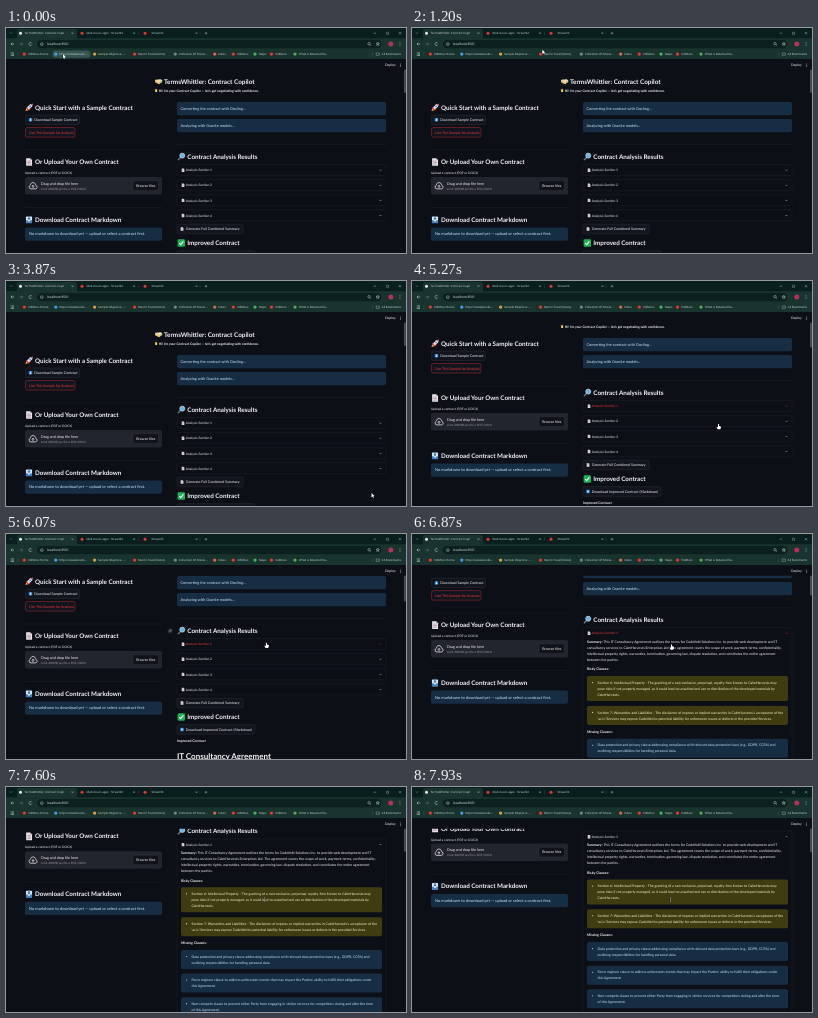
Animation, 400 px wide and 225 px high, one loop 8000 ms. Source, as an HTML page with a canvas:

```html
<!DOCTYPE html>
<html lang="en">
<head>
<meta charset="utf-8">
<title>Contract Copilot</title>
<style>
html, body { margin: 0; width: 100%; height: 100%; overflow: hidden; background: #0c0f16; }
canvas { display: block; width: 100vw; height: 100vh; }
</style>
</head>
<body>
<canvas></canvas>
<script>
const canvas = document.querySelector('canvas');
const ctx = canvas.getContext('2d');
const LOOP = 8000;
const PAGE = '#0c0f16', WHITE = '#f4f5f7', GREY = '#9a9ba2', RED = '#f0383f', LINE = '#2b2e37';
const BLUE = '#172d43', BLUE_TEXT = '#c7e6fa', YELLOW = '#3f3c12', YELLOW_TEXT = '#f7f5bd';
const BAR = '#19332f', BAR_TEXT = '#cfdcd8';
const PAGE_FONT = 'Lato, sans-serif', BAR_FONT = '"Open Sans", sans-serif';
const DETAIL = 3.5;

// Each track is a list of [time, ...values], eased between neighbours.
const CURSOR = [[0, 57, 26], [350, 57, 26], [2000, 197, 17.5], [2350, 197, 17.5], [3700, 365.5, 212],
  [4250, 365.5, 212], [5000, 306.5, 143], [5300, 306.5, 143], [5850, 260.5, 108.5], [7000, 259.5, 110.5],
  [7300, 259.5, 110.5], [7800, 258.3, 110.5]];
const SCROLL = [[0, 0], [5000, 0], [5240, 17], [5500, 17], [5950, 32], [6750, 32], [7110, 73.5],
  [7350, 73.5], [7800, 92.5]];
const OPEN = [[0, 0], [6250, 0], [6600, 1]];

function sample(track, t) {
  const next = track.findIndex(key => key[0] > t);
  if (next < 0) return track[track.length - 1].slice(1);
  const a = track[next - 1], b = track[next];
  const p = (t - a[0]) / (b[0] - a[0]), eased = p * p * (3 - 2 * p);
  return a.slice(1).map((v, i) => v + (b[i + 1] - v) * eased);
}

function text(s, x, y, size, color = WHITE, weight = 400, font = PAGE_FONT) {
  ctx.font = `${weight} ${size}px ${font}`;
  ctx.fillStyle = color;
  ctx.fillText(s, x, y + size * 0.34);
}
const barText = (s, x, y, size = 2.9, color = BAR_TEXT) => text(s, x, y, size, color, 400, BAR_FONT);

function box(x, y, w, h, fill, stroke, r = 1.8) {
  ctx.beginPath();
  ctx.roundRect(x, y, w, h, r);
  if (fill) { ctx.fillStyle = fill; ctx.fill(); }
  if (stroke) { ctx.strokeStyle = stroke; ctx.lineWidth = 0.35; ctx.stroke(); }
}
function dot(x, y, r, color) {
  ctx.beginPath();
  ctx.arc(x, y, r, 0, 7);
  ctx.fillStyle = color;
  ctx.fill();
}
function ring(x, y, r, color, width = 0.5, from = 0, to = 7) {
  ctx.beginPath();
  ctx.arc(x, y, r, from, to);
  ctx.strokeStyle = color;
  ctx.lineWidth = width;
  ctx.stroke();
}
function trace(points, close) {
  ctx.beginPath();
  for (let i = 0; i < points.length; i += 2) ctx.lineTo(points[i], points[i + 1]);
  if (close) ctx.closePath();
}
function line(points, color, width = 0.5) {
  trace(points);
  ctx.strokeStyle = color;
  ctx.lineWidth = width;
  ctx.stroke();
}
function shape(points, color) {
  trace(points, true);
  ctx.fillStyle = color;
  ctx.fill();
}
function at(x, y, scale, draw) {
  ctx.save();
  ctx.translate(x, y);
  ctx.scale(scale, scale);
  draw();
  ctx.restore();
}
const rule = (x, y, w) => line([x, y, x + w, y], LINE, 0.3);
const chevron = (x, y, d, color = WHITE) => line([x - 1, y - d, x, y + d, x + 1, y - d], color, 0.4);
const cross = (x, y, r, color) => { line([x - r, y - r, x + r, y + r], color, 0.4); line([x - r, y + r, x + r, y - r], color, 0.4); };
const moreDots = (x, y, color) => [-1.3, 0, 1.3].forEach(d => dot(x, y + d, 0.42, color));

// Icons fill about 8 x 8 units around their centre.
const icons = {
  handshake() {
    shape([-4, -1, -1.6, -2.6, 1, -1.6, 3, 1, 0.6, 3, -2.5, 1.8], '#efc77d');
    shape([4, -1, 1.6, -2.8, -1, -1.4, 0.5, 0.3, 2, -0.3, 3.2, 1], '#f7e2b5');
    box(-4, -2, 1.2, 3, '#c9d3d9', null, 0.3);
    box(2.9, -2, 1.2, 3, '#c9d3d9', null, 0.3);
  },
  wave() {
    box(-2.2, -1.5, 5, 5, '#f3d24b', null, 2);
    [-1.6, -0.1, 1.4].forEach(x => box(x, -4, 1.2, 4, '#f3d24b', null, 0.6));
    line([-3.5, -2, -2.8, -3.5], '#7fbd58', 0.8);
  },
  rocket() {
    shape([-3.8, 3.8, -2.8, 0.8, -0.8, 2.8], '#ffb02e');
    shape([-3.4, 0.3, -0.5, -1.6, 1.7, 0.6, 0, 3.5], '#e4314d');
    shape([4, -4, 1, -3.4, -2, 0.2, -0.2, 2, 3.3, -1], '#d9dfe6');
    shape([4, -4, 1.8, -3.5, 3.4, -1.8], '#e4314d');
    dot(1.2, -1.2, 0.9, '#3d8ad0');
  },
  page() {
    shape([-3, -4, 1.2, -4, 3.2, -2, 3.2, 4, -3, 4], '#e9e6ea');
    shape([1.2, -4, 3.2, -2, 1.2, -2], '#a9a6b6');
    [-1, 0.6, 2.2].forEach(y => line([-1.8, y, 2, y], '#9c6d80', 0.6));
  },
  inbox() {
    box(-3.2, -3.2, 6.4, 7, '#dce9f5', null, 0.7);
    shape([-3.2, 0.7, -1.5, 0.7, -0.8, 2, 0.8, 2, 1.5, 0.7, 3.2, 0.7, 3.2, 4, -3.2, 4], '#3f7fc4');
    line([0, -4, 0, -0.8], '#2b70bd', 1.2);
    shape([-1.8, -1.4, 1.8, -1.4, 0, 0.8], '#2b70bd');
  },
  lens() {
    line([-0.8, 0.9, -3.6, 3.7], '#6f7d8c', 1.4);
    dot(1, -1, 2.6, '#5fb4e8');
    ring(1, -1, 2.6, '#d7dfe6', 0.8);
  },
  check() {
    box(-3.9, -3.9, 7.8, 7.8, '#16b455', null, 1.4);
    line([-2.1, 0.2, -0.6, 1.8, 2.2, -1.7], '#fff', 1.2);
  },
  download() {
    box(-4, -4, 8, 8, '#2b86d3', null, 1.2);
    line([0, -2.8, 0, 1.5], '#fff', 1.4);
    shape([-2.4, 0, 2.4, 0, 0, 3], '#fff');
  },
  cloud() {
    ctx.beginPath();
    ctx.arc(-2, 1, 1.9, 1.57, 4.3);
    ctx.arc(0, -1, 2.5, 3.5, 6);
    ctx.arc(2.3, 1.1, 1.8, 5, 7.85);
    ctx.closePath();
    ctx.strokeStyle = WHITE;
    ctx.lineWidth = 0.7;
    ctx.stroke();
    line([0, 2.2, 0, -0.6], WHITE, 0.7);
    line([-1.2, 0.6, 0, -0.7, 1.2, 0.6], WHITE, 0.7);
  },
};

function heading(icon, s, x, y) {
  at(x + 4, y, 0.95, icons[icon]);
  text(s, x + 10, y, 6.28, WHITE, 700);
}
function button(x, y, w, label, icon, color = WHITE) {
  box(x, y - 4.8, w, 9.6, '#12151d', color === WHITE ? '#3a3d46' : color);
  if (icon) at(x + 5, y, 0.44, icons[icon]);
  text(label, x + (icon ? 8.8 : 3.6), y, 3.6, color);
}
function notice(x, y, w, h, lines, fill, color) {
  box(x, y, w, h, fill);
  const first = y + h / 2 - (lines.length - 1) * 3;
  dot(x + 5.6, first, 0.55, color);
  lines.forEach((s, i) => text(s, x + 10.5, first + i * 6, DETAIL, color));
}

function leftColumn() {
  heading('rocket', 'Quick Start with a Sample Contract', 19, 79.5);
  button(19.5, 91.8, 54, 'Download Sample Contract', 'download');
  button(19.5, 104.3, 49.5, 'Use This Sample for Analysis', null, RED);
  rule(19, 122, 137);
  heading('page', 'Or Upload Your Own Contract', 19, 134);
  text('Upload a contract (PDF or DOCX)', 19, 145, 3.2);
  box(19, 149, 137, 17.5, '#23252e');
  at(27, 158, 1, icons.cloud);
  text('Drag and drop file here', 35, 155.3, 3.7);
  text('Limit 200MB per file • PDF, DOCX', 35, 160.8, 2.95, GREY);
  box(127, 152.8, 25.5, 9.6, '#10131a', '#3a3d46');
  text('Browse files', 130.3, 157.6, 3.6);
  rule(19, 179.5, 137);
  heading('inbox', 'Download Contract Markdown', 19, 191.5);
  box(19, 199.5, 137, 13.2, BLUE);
  text('No markdown to download yet — upload or select a contract first.', 23, 206.1, 4.05, BLUE_TEXT);
}

function expander(n, y, color, open) {
  at(177, y, 0.42, icons.page);
  text('Analysis Section ' + n, 179.8, y, 3.3, color);
  chevron(374.5, y, open > 0.5 ? -0.5 : 0.5, color);
}

function analysisDetails() {
  text('Summary: ', 175, 150.5, DETAIL, WHITE, 700);
  const indent = ctx.measureText('Summary: ').width;
  text('This IT Consultancy Agreement outlines the terms for CodeVeld Solutions Inc. to provide web development and IT', 175 + indent, 150.5, DETAIL);
  ['consultancy services to CalmHarvests Enterprises Ltd. The agreement covers the scope of work, payment terms, confidentiality,',
    'intellectual property rights, warranties, termination, governing law, dispute resolution, and constitutes the entire agreement',
    'between the parties.'].forEach((s, i) => text(s, 175, 156.5 + i * 6, DETAIL));
  text('Risky Clauses:', 175, 178, DETAIL, WHITE, 700);
  notice(175, 185, 201, 25, [
    'Section 6: Intellectual Property - The granting of a non-exclusive, perpetual, royalty-free license to CalmHarvests may',
    'pose risks if not properly managed, as it could lead to unauthorized use or distribution of the developed materials by',
    'CalmHarvests.'], YELLOW, YELLOW_TEXT);
  notice(175, 214.8, 201, 19, [
    "Section 7: Warranties and Liabilities - The disclaimer of express or implied warranties in CalmHarvests's acceptance of the",
    "'as is' Services may expose CodeVeld to potential liability for unforeseen issues or defects in the provided Services."],
    YELLOW, YELLOW_TEXT);
  text('Missing Clauses:', 175, 240.5, DETAIL, WHITE, 700);
  [['Data protection and privacy clause addressing compliance with relevant data protection laws (e.g., GDPR, CCPA) and',
    'outlining responsibilities for handling personal data.'],
  ["Force majeure clause to address unforeseen events that may impact the Parties' ability to fulfill their obligations under",
    'this Agreement.'],
  ['Non-compete clause to prevent either Party from engaging in similar services for competitors during and after the term',
    'of this Agreement.']].forEach((s, i) => notice(175, 247.6 + i * 23.6, 201, 19, s, BLUE, BLUE_TEXT));
}

function rightColumn(t) {
  const [open] = sample(OPEN, t), grow = open * 230;
  const sectionColor = t > 4950 && t < 7400 ? RED : WHITE;
  box(171, 74, 209, 13.2, BLUE);
  text('Converting the contract with Docling...', 174.5, 80.6, 3.85, BLUE_TEXT);
  box(171, 91, 209, 13.2, BLUE);
  text('Analyzing with Granite models...', 174.5, 97.6, 3.85, BLUE_TEXT);
  rule(171, 116.5, 209);
  heading('lens', 'Contract Analysis Results', 171.3, 128.6);
  if (t > 5650 && t < 6700) {
    box(161.5, 126.2, 5.4, 5.4, '#1c1f28');
    ring(163.6, 129.3, 0.9, GREY, 0.4);
    ring(164.8, 128.4, 0.9, GREY, 0.4);
  }
  box(171, 136.6, 209, 11 + grow, null, LINE);
  expander(1, 142.2, sectionColor, open);
  if (open) {
    ctx.save();
    ctx.beginPath();
    ctx.rect(171, 146, 209, grow);
    ctx.clip();
    analysisDetails();
    ctx.restore();
  }
  ctx.save();
  ctx.translate(0, grow);
  [2, 3, 4].forEach(n => {
    const y = 127.1 + n * 15.1;
    box(171, y - 5.6, 209, 11, null, LINE);
    expander(n, y, WHITE, 0);
  });
  button(171, 201, 66, 'Generate Full Combined Summary', 'page');
  heading('check', 'Improved Contract', 171.3, 215);
  button(171, 227.5, 78, 'Download Improved Contract (Markdown)', 'download');
  text('Improved Contract', 171, 238.7, 3.45, WHITE, 700);
  text('IT Consultancy Agreement', 171, 254, 8, WHITE, 700);
  ctx.restore();
}

function page(t) {
  const [scroll] = sample(SCROLL, t), [open] = sample(OPEN, t);
  ctx.save();
  ctx.translate(0, -scroll);
  at(152.6, 53.5, 0.88, icons.handshake);
  text('TermsWhittler: Contract Copilot', 158, 53.5, 6.4, WHITE, 700);
  at(150, 62.5, 0.42, icons.wave);
  text("Hi! I'm your Contract Copilot — let's get negotiating with confidence.", 152.8, 62.5, 3.3, WHITE, 700);
  leftColumn();
  rightColumn(t);
  ctx.restore();
  box(398.2, 31 + scroll * 0.08, 1.5, 34 - open * 7, '#5b5e66', null, 0.7);
  box(0, 31, 400, 10.8, PAGE, null, 0);
  text('Deploy', 379, 37.3, 3.4);
  moreDots(394.3, 37.3, WHITE);
}

function tab(x, icon, title, titleX, closeX) {
  dot(x, 5.2, 1.5, icon);
  barText(title, titleX, 5.2);
  cross(closeX, 5.2, 0.8, BAR_TEXT);
}

function browser(cursorX, cursorY) {
  box(0, 0, 400, 11, '#081f1d', null, 0);
  box(0, 10.2, 400, 20.8, BAR, null, 0);
  box(11, 1, 60, 12, BAR, null, 2);
  chevron(5, 5, 0.5, BAR_TEXT);
  tab(14.5, '#e6eeec', 'TermsWhittler: Contract Copil', 18.5, 66.5);
  tab(76, '#ef3434', 'Multi-tours apps · Streamlit', 80.5, 128);
  tab(139, '#ef3434', 'Streamlit', 145.5, 190.5);
  line([132.5, 3.5, 132.5, 7], '#456460', 0.3);
  line([194, 3.5, 194, 7], '#456460', 0.3);
  line([198.7, 5.2, 201.3, 5.2], BAR_TEXT, 0.4);
  line([200, 3.9, 200, 6.5], BAR_TEXT, 0.4);
  line([367.7, 5.2, 370.2, 5.2], BAR_TEXT, 0.4);
  box(380.4, 4.2, 2.2, 2.2, null, BAR_TEXT, 0.3);
  cross(394, 5.2, 1.1, BAR_TEXT);

  line([8.2, 16, 5, 16], BAR_TEXT);
  line([6.4, 14.6, 5, 16, 6.4, 17.4], BAR_TEXT);
  line([13.4, 16, 16.6, 16], '#6f8581');
  line([15.2, 14.6, 16.6, 16, 15.2, 17.4], '#6f8581');
  ring(24.5, 16, 1.5, BAR_TEXT, 0.5, 0.4, 5.6);
  box(31, 11.9, 344.5, 8.4, '#0c211f', null, 4.2);
  ring(35.8, 16.1, 1.4, BAR_TEXT, 0.4);
  line([35.8, 15.8, 35.8, 17], BAR_TEXT, 0.4);
  barText('localhost:8501', 41, 16.1, 3.25, WHITE);
  ring(363, 15.7, 1.2, BAR_TEXT, 0.45);
  line([363.9, 16.6, 365, 17.7], BAR_TEXT);
  trace(Array.from({ length: 10 }, (_, i) => {
    const angle = (i * Math.PI) / 5, r = i % 2 ? 0.8 : 1.7;
    return [371.8 + r * Math.sin(angle), 16 - r * Math.cos(angle)];
  }).flat(), true);
  ctx.stroke();
  dot(384.8, 16, 2.5, '#b5305a');
  moreDots(394, 16, BAR_TEXT);

  if (cursorY > 22.5 && cursorY < 31 && cursorX > 47 && cursorX < 84) box(46.5, 22.4, 38, 7.4, '#365550', null, 3.5);
  for (let i = 0; i < 9; i++) box(4.8 + (i % 3) * 1.2, 24.6 + Math.floor(i / 3) * 1.2, 0.75, 0.75, BAR_TEXT, null, 0.1);
  line([12, 24, 12, 28.4], '#4b6a64', 0.3);
  [[18.3, '#ef3434', 'VidMoss Home', 22], [49.8, '#4d9be8', 'https://www.books...', 53.3],
    [88.6, '#d9a13f', 'Sample Objective - ...', 92], [128.6, '#ef3434', 'Merrin Tovel (Notes)', 132],
    [169.3, '#6b8a86', 'Collection Of Movie...', 173], [208.7, '#e06550', 'Inbox', 212.2],
    [227.3, '#ef3434', 'VidMoss', 231], [249, '#4fb062', 'Maps', 253],
    [265.5, '#ef3434', 'VidMoss', 269.3], [289, '#5aa858', 'What is Retained Ea...', 293],
  ].forEach(([x, color, label, labelX]) => { dot(x, 26.1, 1.65, color); barText(label, labelX, 26.1); });
  line([366.5, 24, 366.5, 28.4], '#4b6a64', 0.3);
  box(370.2, 25, 3.2, 2.4, null, BAR_TEXT, 0.3);
  barText('All Bookmarks', 375.8, 26.1);
}

const pointers = {
  arrow: [0, 0, 0, 4.4, 1, 3.5, 1.7, 5, 2.4, 4.7, 1.7, 3.2, 3, 3.1],
  hand: [-0.5, 0, 0.5, 0, 0.6, 1.9, 2.4, 2.4, 2.4, 4, 1.7, 5.2, -0.8, 5.2, -2, 3.4, -1.5, 2.8, -0.6, 3.4],
  beam: [-0.8, 0, 0.8, 0, 0.2, 0.4, 0.2, 3.6, 0.8, 4, -0.8, 4, -0.2, 3.6, -0.2, 0.4],
};
function pointer(x, y, kind) {
  at(x, y, 1, () => {
    trace(pointers[kind], true);
    ctx.strokeStyle = '#05070a';
    ctx.lineWidth = 0.6;
    ctx.stroke();
    shape(pointers[kind], '#fff');
  });
}

function frame() {
  const t = performance.now() % LOOP;
  const ratio = window.devicePixelRatio || 1;
  const w = Math.round(innerWidth * ratio), h = Math.round(innerHeight * ratio);
  if (canvas.width !== w || canvas.height !== h) { canvas.width = w; canvas.height = h; }
  ctx.setTransform(w / 400, 0, 0, h / 225, 0, 0);
  ctx.textRendering = 'geometricPrecision';
  ctx.fillStyle = PAGE;
  ctx.fillRect(0, 0, 400, 225);
  const [x, y] = sample(CURSOR, t);
  page(t);
  browser(x, y);
  pointer(x, y, t < 4950 ? 'arrow' : t < 7400 ? 'hand' : 'beam');
  requestAnimationFrame(frame);
}
requestAnimationFrame(frame);
</script>
</body>
</html>
```
